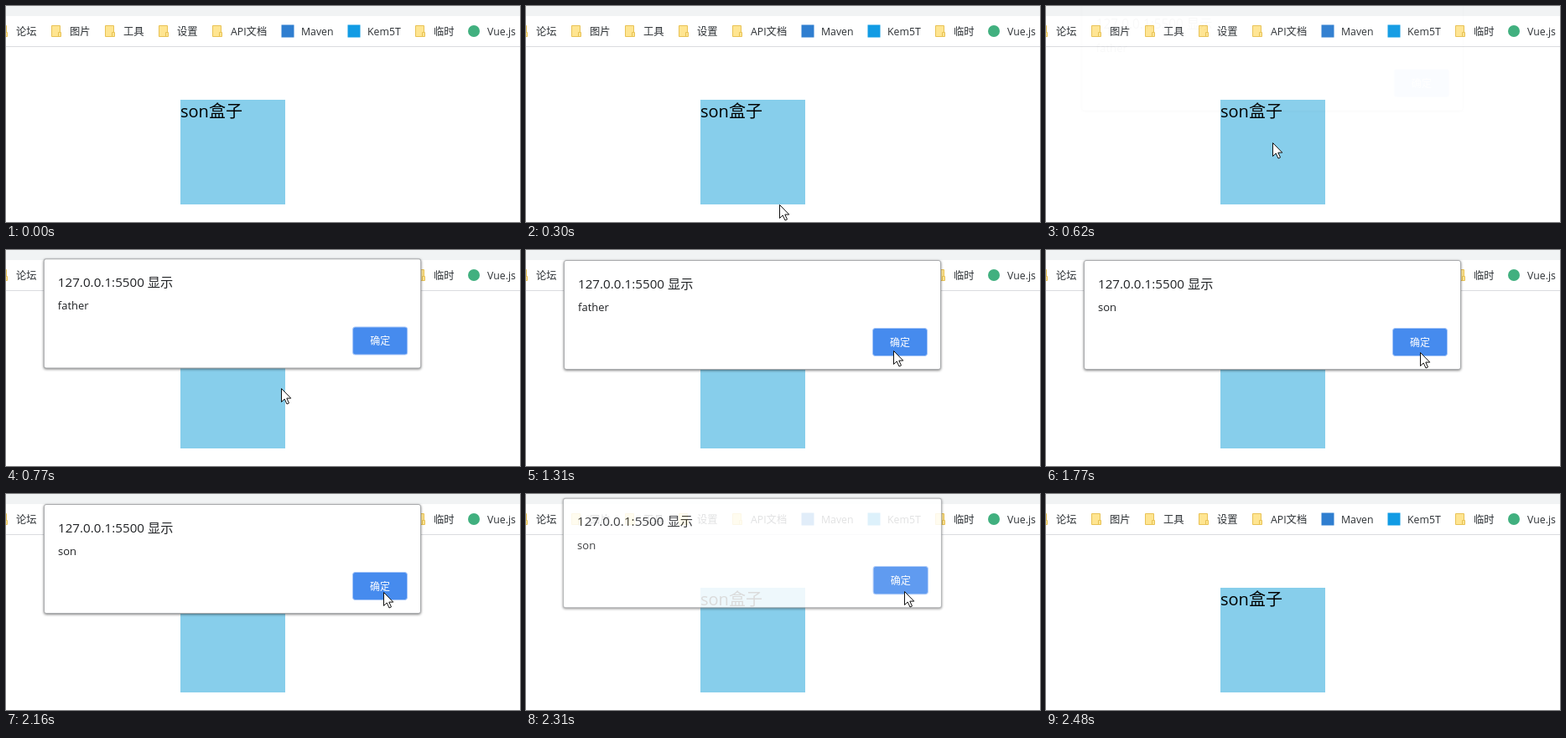
An HTML page that plays this animation: 613x258 px, repeating every 3.01 s.

```html
<!DOCTYPE html>
<html lang="zh-CN">
<head>
<meta charset="utf-8">
<title>弹窗演示</title>
<style>
  html, body { margin: 0; width: 100%; height: 100%; overflow: hidden; background: #fff; }
  svg { display: block; width: 613px; height: 258px; }
  text { font-family: "Open Sans", "Noto Sans CJK SC", "Noto Sans CJK JP", sans-serif; white-space: pre; }
  #bookmarks text { font-size: 12.3px; fill: #2c3034; }
  .dialog { transform-origin: 270px 77px; fill: #1f2124; }
  .panel { fill: #fff; stroke: #a9abad; filter: drop-shadow(0 1px 1.6px rgba(0, 0, 0, .5)); }
  .button { fill: #468bee; stroke: #a6c6f8; }
  .button + text { font-size: 12px; font-weight: 500; fill: #fff; text-anchor: middle; }
</style>
</head>
<body>
<svg viewBox="0 0 613 258">
  <defs>
    <g id="folder" fill="#ffe591" stroke="#e8c255">
      <path d="M.5 .5h10v13h-10z"/>
      <path d="M8.5 8.5h3v5h-3z"/>
    </g>
  </defs>

  <rect width="613" height="12" fill="#f1f3f4"/>
  <rect y="48" width="613" height="1" fill="#dadce0"/>
  <g id="bookmarks"></g>

  <rect x="208" y="112" width="125" height="125" fill="#87ceeb"/>
  <text x="208" y="133" font-size="20">son盒子</text>

  <g id="dialogs"></g>
  <path id="cursor" d="M.5 .5v16l3.7-3.5 2.8 6 2.5-1.1-2.7-5.8h5z" fill="#fff" stroke="#111" stroke-linejoin="round"/>
</svg>

<script>
const LOOP = 3010;
const FIRST_TICK = 148, TICK = 77.2, TICKS = 31;
const OPEN_MS = 240, CLOSE_MS = 160;
const byId = id => document.getElementById(id);
const clamp = value => Math.min(1, Math.max(0, value));

// Bookmarks
const folder = x => `<use href="#folder" x="${x - 22}" y="23"/>`;
const square = color => x => `<rect x="${x - 23.5}" y="22.5" width="15" height="15" fill="${color}"/>`;
const disc = color => x => `<circle cx="${x - 16}" cy="30" r="7" fill="${color}"/>`;
const bookmark = (x, label, icon = folder) => `${icon(x)}<text x="${x}" y="35">${label}</text>`;

byId("bookmarks").innerHTML = [
  ...["论坛", "图片", "工具", "设置", "API文档"].map((label, i) => bookmark(12 + 64 * i, label)),
  bookmark(352, "Maven", square("#2f7ed0")),
  bookmark(431, "Kem5T", square("#119be4")),
  bookmark(510, "临时"),
  bookmark(574, "Vue.js", disc("#41b07f"))
].join("");

// The screen refreshes in even ticks, so every pose is sampled there and held.
function play(node, pose) {
  const frames = [{ ...pose(0), offset: 0, easing: "step-end" }];
  for (let i = 0; i < TICKS; i++) {
    const time = FIRST_TICK + i * TICK;
    frames.push({ ...pose(time), offset: time / LOOP, easing: "step-end" });
  }
  frames.push({ ...frames.at(-1), offset: 1 });
  node.animate(frames, { duration: LOOP, iterations: Infinity });
}

// Dialogs drop in while fading, then rise and fade out.
function dialogPose(time, open, close) {
  const entered = clamp((time - open) / OPEN_MS);
  const left = clamp((time - close) / CLOSE_MS);
  const lift = 22 * (1 - entered) ** 2 + 19 * left;
  return {
    opacity: clamp((entered - .07) * 1.6) * (1 - left ** 2),
    transform: `translate(0px, ${-lift}px) scale(${1 + lift * .0006})`
  };
}

function addDialog(message, open, close) {
  byId("dialogs").insertAdjacentHTML("beforeend", `<g class="dialog">
    <rect class="panel" x="45.5" y="12.5" width="449" height="130" rx="2.5"/>
    <text x="62" y="45.5" font-size="15.2">127.0.0.1:5500 显示</text>
    <text x="62" y="73" font-size="13">${message}</text>
    <rect class="button" x="413.5" y="93.5" width="65" height="33" rx="3"/>
    <text x="446" y="115">确定</text>
  </g>`);
  play(byId("dialogs").lastElementChild, time => dialogPose(time, open, close));
}
addDialog("father", 590, 1400);
addDialog("son", 1525, 2250);

// The cursor eases between a few resting points.
const stops = [
  { at: 148, x: 306, y: 246 },
  { at: 534, x: 270, y: 163 },
  { at: 688, x: 270, y: 163 },
  { at: 765, x: 328, y: 165 },
  { at: 1152, x: 438, y: 126 },
  { at: 1306, x: 438, y: 120 },
  { at: 1769, x: 446, y: 122 },
  { at: 2309, x: 451, y: 116 },
  { at: 2386, x: 515, y: 168 }
];

function cursorPose(time) {
  const visible = time >= FIRST_TICK && time < FIRST_TICK + (TICKS - 1) * TICK;
  const next = Math.max(1, stops.findIndex(stop => stop.at > time));
  const from = stops[next - 1];
  const to = stops[next];
  const done = time >= stops.at(-1).at;
  const u = clamp((time - from.at) / (to.at - from.at));
  const ease = u * u * (3 - 2 * u);
  const along = axis => done ? stops.at(-1)[axis] : from[axis] + (to[axis] - from[axis]) * ease;
  return {
    opacity: visible ? 1 : 0,
    transform: `translate(${Math.round(along("x"))}px, ${Math.round(along("y"))}px)`
  };
}
play(byId("cursor"), cursorPose);
</script>
</body>
</html>
```
